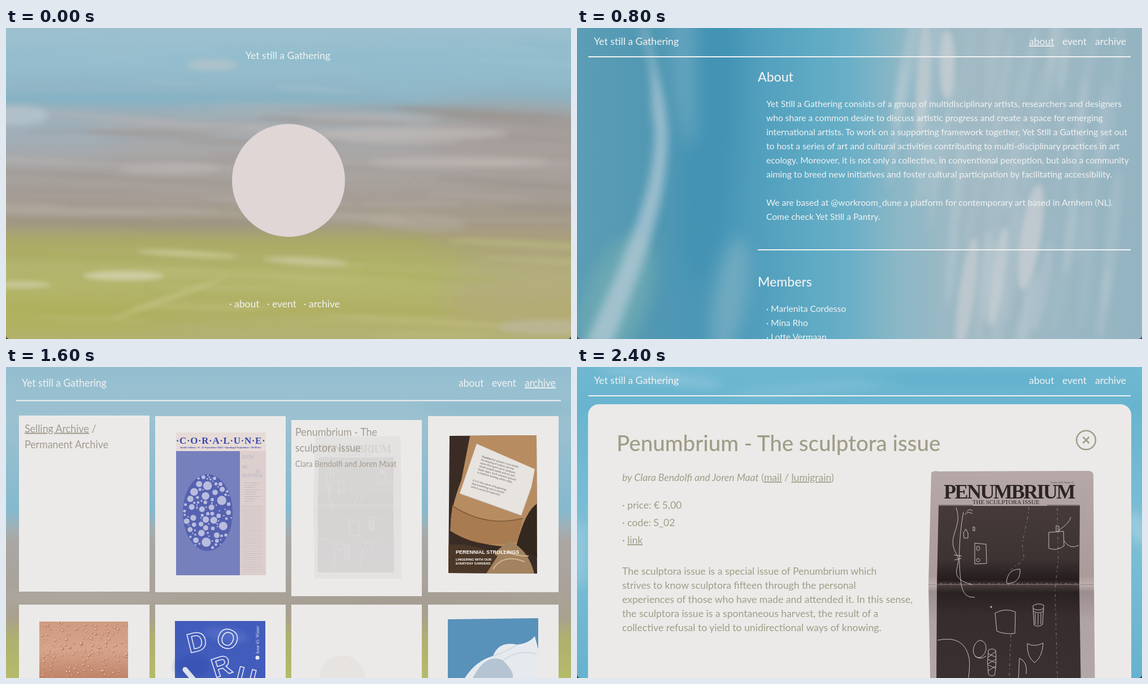
Animation of 1000x551 px, one loop 3.2 s. Source, as an HTML page:

```html
<!DOCTYPE html>
<html lang="en">
<head>
<meta charset="utf-8">
<title>Yet still a Gathering</title>
<style>
  html, body { margin: 0; width: 100%; height: 100%; overflow: hidden; background: #333; }
  svg { display: block; width: 1000px; height: 551px; font-family: Lato, "Open Sans", sans-serif; }
  text { white-space: pre; }
  .u { text-decoration: underline; text-decoration-thickness: 1px; text-underline-offset: 2px; }
  .serif { font-family: "Liberation Serif", serif; }
  .sans { font-family: "Liberation Sans", sans-serif; font-weight: bold; }
</style>
</head>
<body>
<svg id="stage" viewBox="0 0 1000 551"></svg>
<script>
const HOLD = 800;
const site = "Yet still a Gathering", siteCaps = "Yet Still a Gathering";
const journal = "Penumbrium", authors = "Clara Bendolfi and Joren Maat";
const white = "#f1f2f2", paper = "#ebeae8", olive = "#a09d88", taupe = "#a29a8d";

let seed = 11;
const random = (a = 0, b = 1) => a + (b - a) * (seed = seed * 16807 % 2147483647) / 2147483647;
const repeat = (n, make) => Array.from({ length: n }, (_, i) => make(i)).join("");

const rect = (x, y, w, h, fill, more = "") =>
  `<rect x="${x}" y="${y}" width="${w}" height="${h}" fill="${fill}" ${more}/>`;
const circle = (x, y, r, fill, more = "") => `<circle cx="${x}" cy="${y}" r="${r}" fill="${fill}" ${more}/>`;
const path = (d, fill, more = "") => `<path d="${d}" fill="${fill}" ${more}/>`;
const stroke = (d, color, width, more = "") => path(d, "none", `stroke="${color}" stroke-width="${width}" ${more}`);
const text = (x, y, size, fill, str, more = "") =>
  `<text x="${x}" y="${y}" font-size="${size}" fill="${fill}" ${more}>${str}</text>`;
const tall = (x, y, size, fill, str, more = "") =>
  text(0, 0, size, fill, str, `transform="translate(${x} ${y}) scale(1 1.12)" ${more}`);
const lines = (x, y, step, size, fill, rows) =>
  rows.map((row, i) => text(x, y + i * step, size, fill, row)).join("");
const under = str => `<tspan class="u">${str}</tspan>`;

// stops: "offset color, offset color", offsets in stage pixels along the axis
const gradient = (id, x, y, stops) =>
  `<linearGradient id="${id}" gradientUnits="userSpaceOnUse" x1="0" y1="0" x2="${x}" y2="${y}">` +
  stops.split(", ").map(s => {
    const [at, color] = s.split(" ");
    return `<stop offset="${at / (x || y)}" stop-color="${color}"/>`;
  }).join("") + "</linearGradient>";

const blobs = (blur, list) => `<g style="filter:blur(${blur}px)">` + list.map(([fill, x, y, rx, ry, turn = 0, o = .7]) =>
  `<ellipse cx="${x}" cy="${y}" rx="${rx}" ry="${ry}" fill="${fill}" opacity="${o}" transform="rotate(${turn} ${x} ${y})"/>`
).join("") + "</g>";

// Random wind-blown streaks between two heights
const streaks = (n, top, bottom, colors) => blobs(4, Array.from({ length: n }, (_, i) =>
  [colors[i % colors.length], random(-50, 1050), random(top, bottom), random(70, 230), random(2, 7), random(-1, 4), random(.15, .45)]));

const backdrop = id => rect(0, 0, 1000, 551, `url(#${id})`);
const corners = path("M0 544Q0 551 7 551H0ZM1000 544Q1000 551 993 551H1000Z", "#38383a");

const header = (write, y, rule, inset, current) =>
  write(30 - inset, y, 17.6, white, site) +
  [["about", 800], ["event", 859], ["archive", 917]].map(([word, x]) =>
    write(x + inset / 2, y, 17.5, white, word, word === current ? 'class="u"' : "")).join("") +
  rect(20 - inset, rule, 960 + inset * 2, 2, white);

const defs = "<defs>" +
  gradient("field", 0, 551, "0 #9dc0cf, 60 #95bece, 125 #8fb4c4, 165 #a3acb2, 220 #a9a7a7, 300 #a69e97, 345 #a39a85, 380 #acaa66, 440 #b5b870, 500 #b2b166, 551 #b4b174") +
  gradient("water", 1000, 0, "0 #5b9db5, 130 #5298b3, 250 #4796b7, 400 #5ca8c3, 480 #69afc7, 570 #8cb7c6, 700 #a2bac4, 1000 #94b4c2") +
  gradient("meadow", 0, 551, "0 #93bed0, 90 #9cc1d0, 255 #85b9cd, 285 #a0b0b5, 310 #aaa6a3, 400 #a9a29a, 445 #a9a18e, 480 #aeb070, 551 #b5bb6a") +
  gradient("sky", 0, 551, "0 #70b8d1, 70 #68b4cf, 300 #7dbfd6, 551 #66b2ce") +
  gradient("ink", 0, 598, "246 #463a3a, 340 #3e3333, 378 #241c1d, 386 #4a3d3c, 400 #2a2122, 440 #382d2e, 598 #3c3132") +
  gradient("sheet", 0, 598, "185 #b5a8a6, 370 #aa9b9a, 386 #bcb0ae, 398 #9c8e8e, 450 #b0a3a3, 598 #b4a8aa") +
  gradient("skin", 0, 551, "450 #cf9a80, 500 #d6a58c, 551 #c08468") +
  '<clipPath id="book"><path d="M785 122L939 121L940 366L783 365Z"/></clipPath></defs>';

function home() {
  return backdrop("field") + blobs(28, [
    ["#a79a8a", 930, 365, 200, 45, 4, .6], ["#a69b94", 950, 200, 220, 60, 4, .7], ["#9cb2c0", 50, 180, 170, 35],
    ["#8fbccd", 850, 75, 240, 35], ["#b5a985", 930, 470, 160, 60, 0, .6], ["#b0b354", 80, 515, 220, 25]
  ]) + streaks(16, 0, 120, ["#a9c4d0", "#86b8cb"]) + streaks(44, 140, 345, ["#bfb9b6", "#968d87"]) +
  streaks(26, 375, 545, ["#c4c387", "#a6a957"]) + blobs(6, [
    ["#7fb2c7", 170, 125, 220, 8], ["#86b2c4", 450, 122, 220, 8], ["#b8c7cf", 20, 155, 55, 18],
    ["#bfc6c9", 365, 65, 46, 9], ["#c2bcba", 720, 187, 170, 11], ["#bcb6b4", 640, 160, 130, 5],
    ["#bfb8b4", 800, 237, 160, 9], ["#9a9088", 860, 160, 180, 4, 6], ["#b9b4b2", 290, 248, 90, 11],
    ["#bdb7b1", 150, 326, 230, 4], ["#9d927e", 230, 349, 270, 4, 2], ["#b5aca0", 730, 343, 85, 17, 4, .5]
  ]) + blobs(4, [
    ["#dad8be", 208, 439, 72, 8], ["#d2d0b0", 25, 455, 55, 6], ["#d0d0a4", 320, 400, 90, 5, 3],
    ["#cdc9a4", 530, 413, 75, 7, 3], ["#c3c285", 290, 478, 110, 5, -20], ["#bfb79f", 960, 530, 90, 14]
  ]) + circle(500, 270, 100, "#e0d6d6") +
  text(424, 55, 17.6, white, site) +
  text(395, 495, 17.5, white, "· about") + text(462, 495, 17.5, white, "· event") +
  text(527, 495, 17.5, white, "· archive") + corners;
}

function about() {
  const rays = Array.from({ length: 46 }, () =>
    ["#c3cfd5", random(545, 1000), random(-40, 580), random(4, 13), random(50, 140), random(4, 12), random(.1, .4)]);
  return backdrop("water") + blobs(14, [
    ["#74aeb2", 70, 480, 55, 120, 20], ["#3f8fb2", 235, 190, 45, 260, 6, .5], ["#7fb1c4", 270, 480, 30, 110, 10],
    ["#7db2c8", 190, 60, 20, 150, -4, .5]
  ]) + blobs(6, rays) + blobs(5, [
    ["#ced2d5", 655, 65, 14, 62], ["#c7ced2", 613, 80, 12, 110, 3], ["#cdd1d4", 803, 370, 18, 95, 9],
    ["#c8ced2", 690, 470, 14, 100, 8], ["#c9d0d4", 745, 440, 12, 90, 8]
  ]) + '<g style="filter:blur(8px)" opacity=".75">' +
    path("M112 0C140 60 128 130 138 180C138 290 90 390 15 560H62C125 400 162 300 160 180C155 110 135 60 122 0Z", "#b4cad6") +
  "</g>" + header(text, 30, 50, 0, "about") +
  text(320, 95, 23, white, "About", 'font-weight="500"') +
  lines(335, 140, 25, 15.6, white, [
    siteCaps + " consists of a group of multidisciplinary artists, researchers and designers",
    "who share a common desire to discuss artistic progress and create a space for emerging",
    `international artists. To work on a supporting framework together, ${siteCaps} set out`,
    "to host a series of art and cultural activities contributing to multi-disciplinary practices in art",
    "ecology. Moreover, it is not only a collective, in conventional perception, but also a community",
    "aiming to breed new initiatives and foster cultural participation by facilitating accessibility.",
    "",
    "We are based at @workroom_dune a platform for contemporary art based in Arnhem (NL).",
    "Come check Yet Still a Pantry."
  ]) + rect(320, 392, 660, 2, white) +
  text(320, 458, 23, white, "Members", 'font-weight="500"') +
  lines(335, 503, 25, 15.6, white, ["· Marlenita Cordesso", "· Mina Rho", "· Lotte Vermaan"]) + corners;
}

// Newspaper front page, shared by the archive card and the detail page
function newspaper() {
  const chalk = "#d8d0ce";
  return path("M627 187Q632 183 640 185L906 184Q914 185 914 192L915 385L917 598H626L622 385Z", "url(#sheet)") +
    path("M640 246H890L889 385L892 580H636L637 385Z", "url(#ink)") +
    text(649, 233, 36, "#2c2425", journal.toUpperCase(), 'class="serif" font-weight="bold" letter-spacing="-2.5"') +
    text(700, 243, 10.8, "#2c2425", "THE SCULPTORA ISSUE", 'class="serif"') +
    text(838, 206, 4, "#4a4040", "October 2022, Volume 31", 'class="serif"') +
    stroke("M640 245H700M832 245H890", "#2c2425", .8) + stroke("M622 385.500H915", "#8c7e7c", .8) +
    stroke("M671 249C684 285 652 300 672 332C684 352 650 372 700 386M684 257C676 300 674 350 681 390Q686 410 704 408" +
      "M667 333l14 2M668 342l12-3M686 262q6-8 14-2M690 256q4-6 10-1M685 303l-1-9 4-7 4 7v9zM701 283l3 1v6h-3z" +
      "M704 312l20 2 1 34-21 1zM708 318a3 4 0 1 1-1 5zM708 340a3 3 0 1 1-1 3z" +
      "M835 293l26-2 1 26q-14 10-27 4zM848 281l5 1v9h-5zM862 308q10 16 26 8M852 290q20-14 22-24" +
      "M760 382q2-24 24-24q2 24-22 26zM740 436q18-10 36-2l-1 38q-18 2-32-4z" +
      "M807 423q9-6 19-1l-2 34q-7 6-15 1zM807 428q10 5 19 0M808 433q10 5 17 0M811 436v20M816 437v20M821 436v20" +
      "M797 490q13 7 28-1q-1 24-15 35q-14-10-13-34M713 484q12 2 11 17q-4 14-15 14q-10-5-7-18q3-10 11-13M704 512q10 8 20 0" +
      "M728 502q6-5 13 0q2 24-2 44q-7 3-11-2q-3-20 0-42M728 508l13 6M727 518l14 6M728 528l13 6M741 504l-13 10M741 518l-14 8M741 530l-13 8" +
      "M638 484Q686 474 694 516Q697 534 688 580M781 560L783 516Q798 522 795 544", chalk, .9) +
    stroke("M800 248C796 290 784 310 790 330S768 350 768 362M850 250L852 340L846 395L851 580M768 474L764 570M642 384H888", chalk, .7,
      'stroke-dasharray="5 4 2 6" opacity=".7"') + circle(733, 425, 1.5, chalk);
}

function spongeCover() {
  const dots = [];
  for (let i = 0; i < 700; i++) {
    const r = 1.2 + 6 * (1 - i / 700) ** 2 * random(.6, 1.2), x = random(313, 401), y = random(190, 327);
    if (((x - 357) / (44 - r)) ** 2 + ((y - 258) / (68 - r)) ** 2 < 1 &&
        dots.every(d => Math.hypot(d[0] - x, d[1] - y) > d[2] + r + 1.2)) dots.push([x, y, r]);
  }
  return rect(301, 116, 159, 253, "#e6dbd7") + rect(301, 149, 113, 220, "#7680bd") + rect(414, 149, 46, 220, "#dccfcd") +
    text(380, 136, 17, "#3b48ac", "·C·O·R·A·L·U·N·E·", 'class="serif" font-weight="bold" text-anchor="middle" letter-spacing=".6"') +
    text(380, 144, 4.6, "#3b48ac", "Inside Gallery • 8 - 22 September 2022 • Opening 8 September • 20.00 hrs", 'class="serif" font-weight="bold" text-anchor="middle"') +
    `<ellipse cx="357" cy="258" rx="44" ry="68" fill="#5662b0"/>` +
    dots.map(([x, y, r]) => circle(x.toFixed(1), y.toFixed(1), r.toFixed(1), "#b9bddc")).join("") +
    [["FLOW", 418, 162], ["BE", 418, 180], ["IN", 442, 188], ["BETWEEN", 418, 195]].map(([s, x, y]) =>
      text(x, y, 7.5, "#b3b0cf", s, 'class="serif"')).join("") +
    repeat(9, i => rect(422, 205 + i * 4, 28 - i % 3 * 5, .8, "#bdb3c4")) +
    repeat(34, i => rect(418, 246 + i * 3.5, 37, .8, "#cbbfc4"));
}

function walkCover() {
  return '<g clip-path="url(#book)">' +
    rect(780, 118, 164, 252, "#3a2c24") +
    path("M822 118H944V330L900 318Q840 320 790 290Q780 270 806 200Z", "#b88c61") +
    path("M790 245Q850 285 915 268L905 310Q840 325 786 290Z", "#a97b51") + stroke("M790 246Q850 285 915 268", "#7f5a39", 1.5) +
    path("M944 240Q920 250 903 318L944 340Z", "#33281f") +
    path("M850 366Q855 330 892 308Q925 325 935 366Z", "#a3835f") + stroke("M862 358Q880 330 918 345M880 325Q900 335 925 335", "#d0b592", 2) +
    path("M783 315Q830 310 870 335L850 366H783Z", "#4b3727") + "</g>" +
    path("M833 136L936 181L930 212L912 263L803 224Z", "#e7e3df") + stroke("M930 212L912 263L803 224", "#c6beb6", 1) +
    '<g transform="translate(842 160) rotate(16)">' +
    lines(0, 0, 5.8, 4.6, "#5b5652", ["<tspan font-weight='bold'>Freedom</tspan> for anyone is not simply", "the keeping of a place, but the", "space that opens up in company,", "where people speak and act and", "begin again. Such common ground", "is made by meeting others daily."]) +
    lines(-4, 45, 5.8, 4.6, "#5b5652", ["It is in the nature of beginnings", "that something new is started", "which cannot be expected."]) + "</g>" +
    text(796, 331, 9, "#fff", "PERENNIAL STROLLINGS", 'class="sans"') +
    text(796, 343, 5.8, "#fff", "LINGERING WITH OUR", 'class="sans"') + text(796, 350, 5.8, "#fff", "EVERYDAY GARDENS", 'class="sans"');
}

function lowerCovers() {
  const letter = (s, x, y, turn) => text(0, 0, 48, "none", s,
    `class="sans" stroke="#e9ebf5" stroke-width="1.6" transform="translate(${x} ${y}) rotate(${turn})"`);
  return rect(59, 451, 157, 100, "url(#skin)") +
    repeat(260, () => {
      const x = random(61, 214), y = random(453, 550), r = random(.7, 2.8);
      return circle(x, y, r, "#ad7359", 'opacity=".55"') + circle(x - r / 3, y - r / 3, r / 2, "#f3d6c6", 'opacity=".85"');
    }) +
    rect(299, 450, 160, 101, "#425cbb") + blobs(5, [["#5a75cb", 390, 475, 40, 12, 10, .6], ["#3450ad", 330, 530, 30, 20, 0, .6]]) +
    letter("D", 325, 507, -14) + letter("O", 369, 490, 22) + letter("R", 370, 551, -18) + letter("U", 404, 562, 14) +
    stroke("M317 536L334 556", "#dfe1ea", 9, 'stroke-linecap="round"') +
    text(0, 0, 7.5, "#e9ebf5", "Issue #1: Winter", 'class="serif" transform="translate(448 508) rotate(-90)"') +
    circle(445, 515, 3.5, "#e9ebf5") +
    circle(595, 551, 40, "#e6e3e0") +
    path("M782 447L942 445V551H782Z", "#5891b9") + path("M812 551Q832 520 862 512Q872 485 905 492Q925 490 936 477L942 500V551Z", "#e6eaee") +
    path("M826 551Q850 505 880 520Q900 540 897 551Z", "#b5c4d2") + stroke("M880 520Q905 500 938 508M862 512Q885 505 905 492", "#cfd8e0", 2);
}

function archive() {
  const card = (x, y) => rect(x, y, 231, 312, "#ebeae9");
  return backdrop("meadow") + blobs(9, [["#86b7cb", 880, 75, 150, 8], ["#b4afab", 120, 408, 180, 6], ["#a0968d", 700, 412, 200, 5]]) +
    header(tall, 35, 58.5, 2, "archive") +
    [23, 264, 505, 747].map((x, i) => card(x, [86, 87, 94, 87][i]) + card(x, 421)).join("") +
    tall(33, 115.5, 17.8, taupe, under("Selling Archive") + " /") + tall(33, 143.5, 17.8, taupe, "Permanent Archive") +
    spongeCover() +
    `<g opacity=".11" transform="translate(544 123) scale(.53 .61) translate(-622 -185)">${newspaper()}</g>` +
    tall(512, 122, 17.9, taupe, journal + " - The") + tall(512, 150, 17.9, taupe, "sculptora issue") +
    tall(512, 177, 13.6, taupe, authors) +
    walkCover() + lowerCovers();
}

function detail() {
  return backdrop("sky") + blobs(9, [
    ["#a3d0e0", 150, 18, 110, 7, 8], ["#8cc6db", 420, 38, 160, 6, -4], ["#5fb0cd", 700, 20, 200, 14],
    ["#a9d3e2", 992, 285, 14, 30, -20], ["#9accdd", 5, 330, 14, 60]
  ]) + header(text, 30, 50, 0) + rect(19.5, 66, 961.5, 520, paper, 'rx="19"') +
  text(70, 149, 38.5, olive, `${journal} - The sculptora issue`, 'font-weight="500"') +
  circle(901, 129.5, 16.8, "none", `stroke="${olive}" stroke-width="2.5"`) +
  stroke("M895.5 124L906.5 135M906.5 124L895.5 135", olive, 2.5) +
  text(80, 202, 17.6, olive, `<tspan font-style="italic">by ${authors}</tspan> (${under("mail")} / ${under("lumigrain")})`) +
  lines(80, 251, 31, 17.6, olive, ["· price: € 5,00", "· code: S_02", "· " + under("link")]) +
  lines(80, 368, 25, 17.6, olive, [
    `The sculptora issue is a special issue of ${journal} which`,
    "strives to know sculptora fifteen through the personal",
    "experiences of those who have made and attended it. In this sense,",
    "the sculptora issue is a spontaneous harvest, the result of a",
    "collective refusal to yield to unidirectional ways of knowing."
  ]) + newspaper() + corners;
}

const stage = document.getElementById("stage");
stage.innerHTML = defs + [home, about, archive, detail].map(scene => `<g class="scene">${scene()}</g>`).join("");
const scenes = stage.querySelectorAll(".scene");

function draw() {
  const current = Math.floor(performance.now() / HOLD) % scenes.length;
  scenes.forEach((scene, i) => scene.style.display = i === current ? "" : "none");
  requestAnimationFrame(draw);
}
draw();
</script>
</body>
</html>
```
